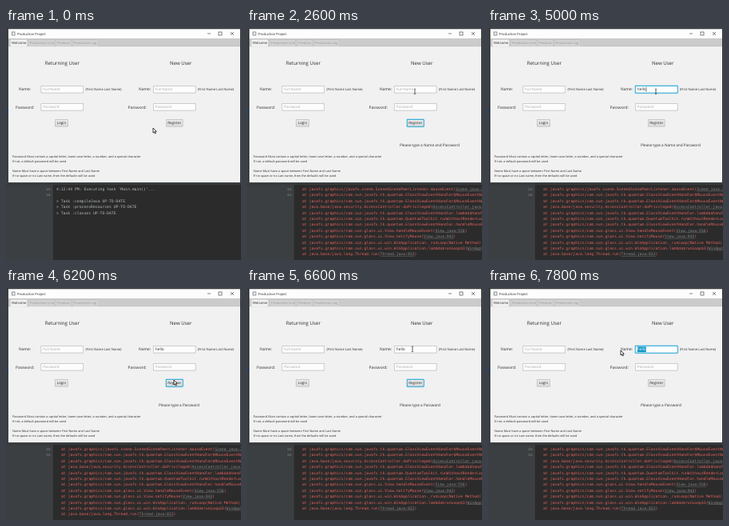
Recreate the animation shown at these times as an HTML page with a canvas. Size 294x290 px, loop 8000 ms.

```html
<!DOCTYPE html>
<html lang="en">
<head>
<meta charset="utf-8">
<title>Production Project</title>
<style>
html, body { margin: 0; width: 100%; height: 100%; overflow: hidden; background: #2b2b2b; }
canvas { display: block; width: 294px; height: 290px; }
</style>
</head>
<body>
<canvas id="stage"></canvas>
<script>
const W = 294, H = 290, LOOP = 8000, STEP = 200;
const SANS = '"Open Sans", "Noto Sans", sans-serif';
const MONO = '"DejaVu Sans Mono", "Liberation Mono", monospace';
const canvas = document.getElementById('stage');
const ctx = canvas.getContext('2d');
const dpr = window.devicePixelRatio || 1;
canvas.width = W * dpr;
canvas.height = H * dpr;

const FX = 'javafx.graphics/com.sun.';
const QUANTUM = FX + 'javafx.tk.quantum.';
const GLASS = FX + 'glass.ui.';
const trace = [
  ['javafx.graphics/javafx.scene.Scene$ScenePeerListener.mouseEvent', 'Scene.java:2588'],
  [QUANTUM + 'GlassViewEventHandler$MouseEventNotification.run', 'GlassViewEventHandler.java:409'],
  [QUANTUM + 'GlassViewEventHandler$MouseEventNotification.run', 'GlassViewEventHandler.java:299'],
  ['java.base/java.security.AccessController.doPrivileged', 'AccessController.java:391'],
  [QUANTUM + 'GlassViewEventHandler.lambda$handleMouseEvent$2', 'GlassViewEventHandler.java:447'],
  [QUANTUM + 'QuantumToolkit.runWithoutRenderLock', 'QuantumToolkit.java:412'],
  [QUANTUM + 'GlassViewEventHandler.handleMouseEvent', 'GlassViewEventHandler.java:446'],
  [GLASS + 'View.handleMouseEvent', 'View.java:556'],
  [GLASS + 'View.notifyMouse', 'View.java:942'],
  [GLASS + 'win.WinApplication._runLoop', 'Native Method'],
  [GLASS + 'win.WinApplication.lambda$runLoop$3', 'WinApplication.java:174'],
  ['java.base/java.lang.Thread.run', 'Thread.java:832']
];

// Pointer path: time, x, y
const path = [
  [0, 184, 125], [200, 184, 125], [1200, 210, 119], [1800, 210, 119],
  [2000, 211, 118], [2400, 210, 79], [5200, 210, 79], [5800, 210, 115],
  [6200, 210, 115], [6600, 207, 76], [6800, 207, 76], [7600, 166, 78], [8000, 166, 78]
];

function pointer(t) {
  let i = 1;
  while (i < path.length - 1 && path[i][0] < t) i++;
  const [t0, x0, y0] = path[i - 1], [t1, x1, y1] = path[i];
  const p = Math.min(1, (t - t0) / (t1 - t0));
  const e = p * p * (3 - 2 * p);
  return [x0 + (x1 - x0) * e, y0 + (y1 - y0) * e];
}

function rect(x, y, w, h, fill) {
  ctx.fillStyle = fill;
  ctx.fillRect(x, y, w, h);
}

function round(x, y, w, h, r, fill) {
  ctx.fillStyle = fill;
  ctx.beginPath();
  ctx.roundRect(x, y, w, h, r);
  ctx.fill();
}

function line(x0, y0, x1, y1, color, width = 0.7) {
  ctx.strokeStyle = color;
  ctx.lineWidth = width;
  ctx.beginPath();
  ctx.moveTo(x0, y0);
  ctx.lineTo(x1, y1);
  ctx.stroke();
}

function text(s, x, y, size, color = '#2b2b2b', font = SANS) {
  ctx.font = size + 'px ' + font;
  ctx.fillStyle = color;
  ctx.fillText(s, x, y);
  return ctx.measureText(s).width;
}

function border(x, y, w, h, focused) {
  if (focused) round(x - 0.7, y - 0.7, w + 1.4, h + 1.4, 1.6, '#a5d8ec');
  round(x, y, w, h, 1.2, focused ? '#0a9bcd' : '#bcbcbc');
}

function field(x, y, prompt, state = {}) {
  const { value = '', focused, caret, selected = 0 } = state;
  border(x, y, 53.5, 9.5, focused);
  round(x + 0.7, y + 0.7, 52.1, 8.1, 0.8, '#fdfdfd');
  const tx = x + 2.8, ty = y + 6.4;
  if (!value && !focused) text(prompt, tx, ty, 4.5, '#a9a9a9');
  const w = text(value, tx, ty, 4.8, '#333');
  if (selected > 0) {
    const sw = w * selected;
    rect(tx + w - sw, y + 1.4, sw, 6.8, '#0a96c6');
    ctx.save();
    ctx.beginPath();
    ctx.rect(tx + w - sw, y, sw, 10);
    ctx.clip();
    text(value, tx, ty, 4.8, '#fff');
    ctx.restore();
  }
  if (caret) line(tx + w + 0.3, y + 1.6, tx + w + 0.3, y + 8, '#222', 0.5);
}

function button(label, x, w, focused, pressed) {
  const y = 114;
  border(x, y, w, 9.5, focused);
  const g = ctx.createLinearGradient(0, y, 0, y + 9);
  g.addColorStop(0, pressed ? '#d2d2d2' : '#ededed');
  g.addColorStop(1, pressed ? '#c8c8c8' : '#dadada');
  round(x + 0.7, y + 0.7, w - 1.4, 8.1, 0.8, g);
  ctx.textAlign = 'center';
  text(label, x + w / 2, y + 6.4, 4.5);
  ctx.textAlign = 'left';
}

function backdrop() {
  rect(0, 0, W, H, '#2b2b2b');
  rect(0, 0, 58, H, '#3c3f41');
  rect(0, 0, W, 1, '#35383a');
  rect(0, 100, 3, 7, '#2c3f55');
  rect(58, 193, 236, 3, '#3a3d3f');
  rect(0, 195.5, W, 0.7, '#303234');
  line(58.3, 196, 58.3, H, '#4a4d4f', 0.6);
  text('10:', 50, 202.8, 4, '#83878a', MONO);
  text('10:', 50, 210.2, 4, '#83878a', MONO);
}

function consoleText(t) {
  const row = i => 203 + i * 7.4;
  const size = 4.77;
  if (t < 2000) {
    const color = '#b4b8bb';
    text("4:12:44 PM: Executing task 'Main.main()'...", 63, row(0), size, color, MONO);
    ['compileJava', 'processResources', 'classes'].forEach((name, i) =>
      text('> Task :' + name + ' UP-TO-DATE', 63, row(i + 2), size, color, MONO));
    return;
  }
  const first = t < 6400 ? 0 : 1;
  const red = '#e0625d', grey = '#858585';
  trace.slice(first).forEach(([call, place], i) => {
    const y = row(i), native = place === 'Native Method';
    let x = 69;
    x += text('at ' + call + '(', x, y, size, red, MONO);
    const w = text(place, x, y, size, native ? red : grey, MONO);
    if (!native) line(x, y + 0.9, x + w, y + 0.9, grey, 0.4);
    text(')', x + w, y, size, red, MONO);
  });
}

function windowFrame() {
  rect(3, 1.5, 290, 191.5, '#f1f1f1');
  rect(3, 1.5, 290, 11.5, '#fdfdfd');
  rect(7, 4.5, 4.5, 5, '#8c9399');
  rect(8, 5.5, 2.5, 3, '#f6f6f6');
  text('Production Project', 14, 8.7, 4.15);
  line(252, 7, 256, 7, '#333', 0.6);
  ctx.strokeStyle = '#333';
  ctx.lineWidth = 0.6;
  ctx.strokeRect(266, 5, 4, 4);
  line(281, 5, 285, 9, '#333', 0.6);
  line(285, 5, 281, 9, '#333', 0.6);
  rect(3, 13, 290, 10, '#cbcbcb');
  line(3, 22.7, 293, 22.7, '#b9b9b9', 0.6);
  [[28, 33], [62, 20], [83, 33]].forEach(([x, w]) => {
    round(x, 14.5, w, 8.2, [1, 1, 0, 0], '#bebebe');
    round(x + 0.5, 15, w - 1, 7.7, [1, 1, 0, 0], '#d2d2d2');
  });
  round(5, 14, 22, 9.2, [1, 1, 0, 0], '#b9b9b9');
  round(5.5, 14.5, 21, 9, [1, 1, 0, 0], '#f1f1f1');
  text('Welcome', 7, 20, 4.3);
  text('Production Line', 30, 20, 4.1, '#999');
  text('Produce', 64, 20, 4.1, '#999');
  text('Production Log', 84.5, 20, 4.1, '#999');
}

function form(t) {
  const nameFocus = (t >= 3200 && t < 5800) || t >= 6800;
  const registerFocus = (t >= 1600 && t < 3200) || (t >= 5800 && t < 6800);
  const typed = t < 3400 ? 0 : t < 3800 ? 1 : Math.min(5, 2 + Math.floor((t - 3800) / 100));
  const selected = Math.max(0, Math.min(1, (197.5 - pointer(t)[0]) / 11));

  text('Returning User', 48.8, 45.5, 6.15);
  text('New User', 205, 45.5, 6.1);
  [[0, 16, 12, 99.5], [140.5, 166, 152.5, 240]].forEach(([dx, nx, px, hx]) => {
    text('Name:', nx, 78.4, 4.9);
    text('Password:', px, 100.7, 4.9);
    text('(First Name Last Name)', hx, 78.2, 4.15);
    field(43.5 + dx, 94, 'Password');
  });
  field(43.5, 72, 'Full Name');
  field(184, 72, 'Full Name', {
    value: 'hello'.slice(0, typed),
    focused: nameFocus,
    caret: nameFocus && t < 6800 && t % 1000 < 600,
    selected: t >= 6800 ? selected : 0
  });
  button('Login', 61, 17, false, false);
  button('Register', 200, 21.5, registerFocus, t === 1600 || t === 5800);
  if (t >= 1800) {
    text('Please type a ' + (t < 6000 ? 'Name and ' : '') + 'Password', 191, 147.5, 4.7);
  }

  const notes = [
    [161.5, 'Password Must contain a capital letter, lower case letter, a number, and a special character'],
    [168, 'If not, a default password will be used'],
    [179.5, 'Name Must have a space between First Name and Last Name'],
    [186, 'If no space or no Last name, then the defaults will be used']
  ];
  notes.forEach(([y, s]) => text(s, 8, y, 3.82));
}

function cursor(t) {
  const [x, y] = pointer(t);
  const beam = x > 184 && x < 237 && y > 72 && y < 82;
  if (beam) {
    line(x, y - 2.6, x, y + 3.4, '#333', 0.8);
    line(x - 1.2, y - 2.8, x + 1.2, y - 2.8, '#333', 0.6);
    line(x - 1.2, y + 3.6, x + 1.2, y + 3.6, '#333', 0.6);
    return;
  }
  const shape = [[0, 0], [0, 6], [1.4, 4.8], [2.4, 7], [3.4, 6.5], [2.5, 4.4], [4.3, 4.3]];
  ctx.beginPath();
  shape.forEach(([dx, dy]) => ctx.lineTo(x + dx, y + dy));
  ctx.closePath();
  ctx.fillStyle = '#fff';
  ctx.strokeStyle = '#111';
  ctx.lineWidth = 0.8;
  ctx.fill();
  ctx.stroke();
}

function draw(now) {
  const t = Math.floor((now % LOOP) / STEP) * STEP;
  ctx.setTransform(dpr, 0, 0, dpr, 0, 0);
  ctx.textRendering = 'geometricPrecision';
  backdrop();
  consoleText(t);
  windowFrame();
  form(t);
  cursor(t);
}

let start;
function tick(now) {
  if (start === undefined) start = now;
  draw(now - start);
  requestAnimationFrame(tick);
}
draw(0);
requestAnimationFrame(tick);
</script>
</body>
</html>
```
